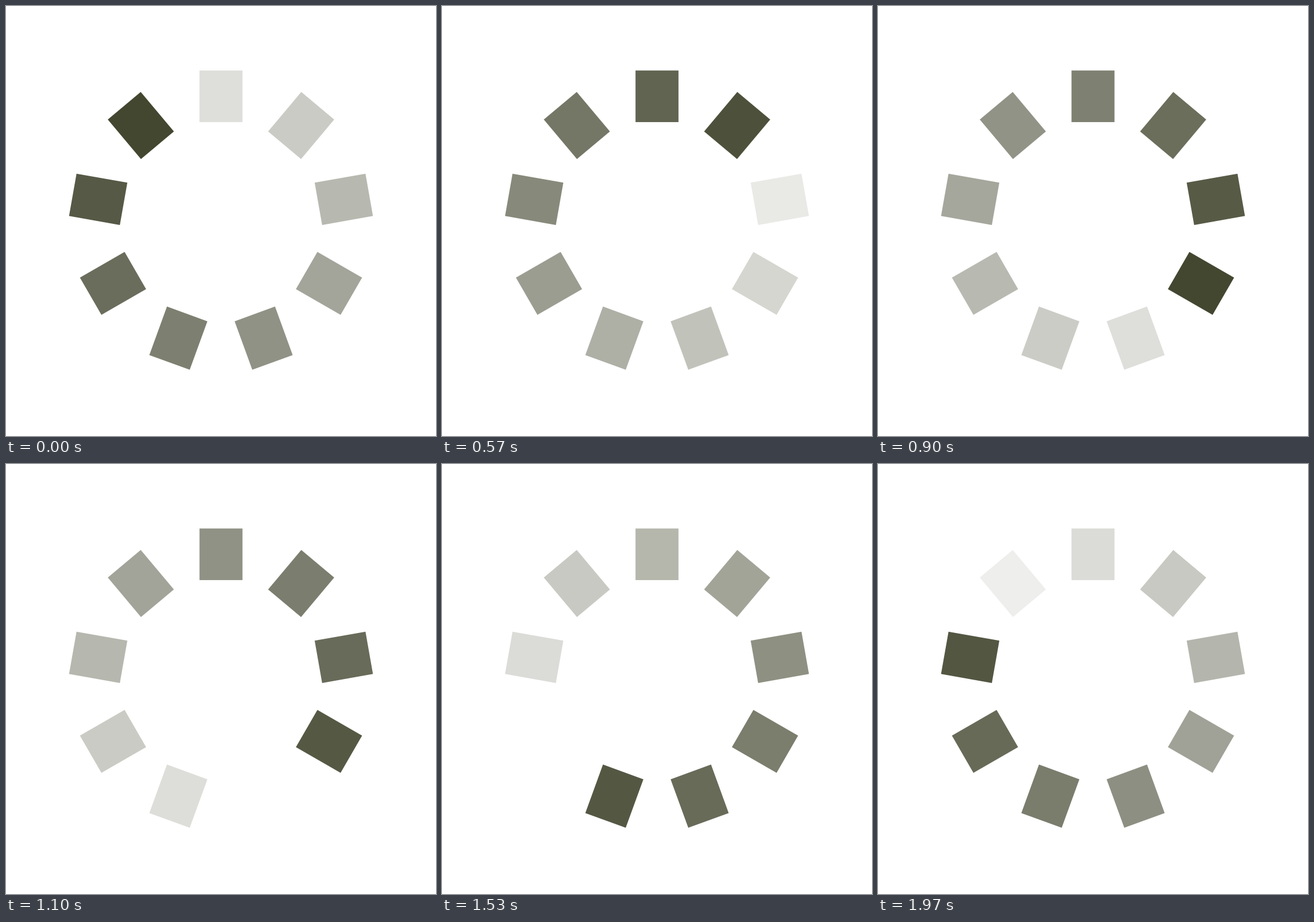
An HTML page with a canvas for the animation above (2 s loop, 748 by 748 pixels).

```html
<!DOCTYPE html>
<html lang="en">
<head>
<meta charset="utf-8">
<title>Spinner</title>
<style>
  html, body { margin: 0; width: 100%; height: 100%; overflow: hidden; background: #fff; }
  canvas { display: block; }
</style>
</head>
<body>
<canvas id="stage" width="748" height="748"></canvas>
<script>
const SIZE = 748;
const LOOP = 2000;
const BLADES = 9;
const TICKS = 180;            // fade length; 3 ticks per step, 60 steps per loop
const STAGGER = TICKS / BLADES;
const ctx = document.getElementById('stage').getContext('2d');

// Steps last 33.3 ms, with their starts rounded to 10 ms.
function stepAt(time) {
  return Math.floor(Math.floor(time / 10) * 0.3 + 0.15);
}

function drawBlade(index, alpha) {
  ctx.save();
  ctx.translate(SIZE / 2, SIZE / 2);
  ctx.rotate(index * 2 * Math.PI / BLADES);
  ctx.fillStyle = `rgba(67, 71, 48, ${alpha})`;
  ctx.fillRect(-0.05 * SIZE, -0.35 * SIZE, 0.1 * SIZE, 0.12 * SIZE);
  ctx.restore();
}

function draw(time) {
  const step = stepAt(time);
  ctx.fillStyle = '#fff';
  ctx.fillRect(0, 0, SIZE, SIZE);
  for (let i = 0; i < BLADES; i++) {
    let left = STAGGER * (i + 1) - 3 * step;
    if (left < 0) left += TICKS;
    // The faintest blade drops out just before it turns dark again.
    if (left >= 3) drawBlade(i, 0.073 + 0.927 * left / TICKS);
  }
}

const start = performance.now();
function tick() {
  draw((performance.now() - start) % LOOP);
  requestAnimationFrame(tick);
}
tick();
</script>
</body>
</html>
```
